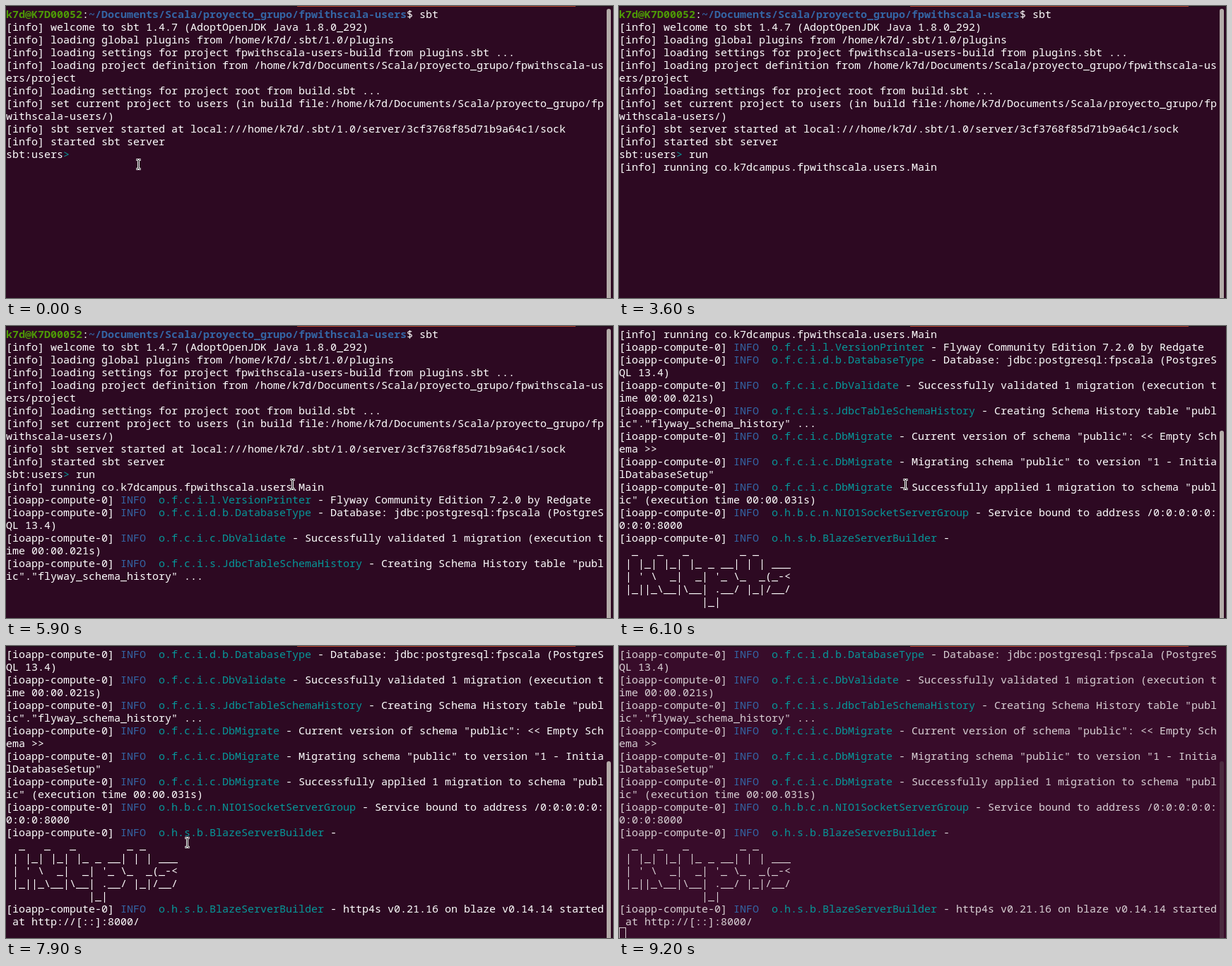
An HTML page that plays this animation: 859x413 px, repeating every 9300 ms.

```html
<!DOCTYPE html>
<html lang="en">
<head>
<meta charset="utf-8">
<title>Terminal</title>
<style>
  html, body { margin: 0; width: 100%; height: 100%; overflow: hidden; }
  body {
    --k: 0%;
    position: relative;
    background: color-mix(in srgb, #2d0922, #380c2a var(--k));
    color: color-mix(in srgb, #fff, #d8d0d4 var(--k));
  }
  pre, div, svg { position: absolute; margin: 0; }
  pre {
    left: 0; top: 2px;
    font: 15px/18px "Noto Sans Mono", "DejaVu Sans Mono", monospace;
    font-variant-ligatures: none;
  }
  .host { color: #4e9a06; font-weight: bold; }
  .path { color: #3465a4; font-weight: bold; }
  .info { color: #3465a4; }
  .name { color: #06989a; }
  #strip { left: 0; top: 0; width: 100%; height: 1px; background: #1f1019; }
  #accent { left: 412px; top: 0; width: 394px; height: 1px; background: #b5482c; }
  #bar {
    left: 850px; width: 6px; height: 420px; border-radius: 3px;
    background: color-mix(in srgb, #b4aca9, #4a2a3f var(--k));
  }
  #caret { width: 9px; height: 18px; background: #fff; }
  #caret.hollow { width: 8px; height: 17px; background: none; border: 1px solid #d8d0d4; }
  #mouse { left: 0; top: 0; }
</style>
</head>
<body>
<pre id="text"></pre>
<div id="caret"></div>
<div id="strip"></div>
<div id="accent"></div>
<div id="bar"></div>
<svg id="mouse" width="9" height="18" fill="none">
  <path id="beam" d="M1.5 2.5H3.5L4.5 3.5L5.5 2.5H7.5M4.5 3V15M1.5 15.5H3.5L4.5 14.5L5.5 15.5H7.5" stroke="#fff" stroke-width="3"/>
  <use href="#beam" style="stroke:#000"/>
  <path d="M1.5 2.5H3.5L4.5 3.5L5.5 2.5H7.5M4.5 3V15M1.5 15.5H3.5L4.5 14.5L5.5 15.5H7.5" stroke="#111"/>
</svg>
<script>
const LOOP = 9300, STEP = 100, ROWS = 23, LINE = 18, CELL = 9;
const $ = id => document.getElementById(id);

const log = String.raw`k7d@K7D00052:~/Documents/Scala/proyecto_grupo/fpwithscala-users$ sbt
[info] welcome to sbt 1.4.7 (AdoptOpenJDK Java 1.8.0_292)
[info] loading global plugins from /home/k7d/.sbt/1.0/plugins
[info] loading settings for project fpwithscala-users-build from plugins.sbt ...
[info] loading project definition from /home/k7d/Documents/Scala/proyecto_grupo/fpwithscala-us
ers/project
[info] loading settings for project root from build.sbt ...
[info] set current project to users (in build file:/home/k7d/Documents/Scala/proyecto_grupo/fp
withscala-users/)
[info] sbt server started at local:///home/k7d/.sbt/1.0/server/3cf3768f85d71b9a64c1/sock
[info] started sbt server
sbt:users> run
[info] running co.k7dcampus.fpwithscala.users.Main
[ioapp-compute-0] INFO  o.f.c.i.l.VersionPrinter - Flyway Community Edition 7.2.0 by Redgate
[ioapp-compute-0] INFO  o.f.c.i.d.b.DatabaseType - Database: jdbc:postgresql:fpscala (PostgreS
QL 13.4)
[ioapp-compute-0] INFO  o.f.c.i.c.DbValidate - Successfully validated 1 migration (execution t
ime 00:00.021s)
[ioapp-compute-0] INFO  o.f.c.i.s.JdbcTableSchemaHistory - Creating Schema History table "publ
ic"."flyway_schema_history" ...
[ioapp-compute-0] INFO  o.f.c.i.c.DbMigrate - Current version of schema "public": << Empty Sch
ema >>
[ioapp-compute-0] INFO  o.f.c.i.c.DbMigrate - Migrating schema "public" to version "1 - Initia
lDatabaseSetup"
[ioapp-compute-0] INFO  o.f.c.i.c.DbMigrate - Successfully applied 1 migration to schema "publ
ic" (execution time 00:00.031s)
[ioapp-compute-0] INFO  o.h.b.c.n.NIO1SocketServerGroup - Service bound to address /0:0:0:0:0:
0:0:0:8000
[ioapp-compute-0] INFO  o.h.s.b.BlazeServerBuilder -
  _   _   _        _ _
 | |_| |_| |_ _ __| | | ___
 | ' \  _|  _| '_ \_  _(_-<
 |_||_\__|\__| .__/ |_|/__/
             |_|
[ioapp-compute-0] INFO  o.h.s.b.BlazeServerBuilder - http4s v0.21.16 on blaze v0.14.14 started
 at http://[::]:8000/`.split("\n");

const PROMPT = 11, PROMPT_LEN = 11;
const keys = [1500, 1700, 2000], enter = 2600;
const output = [[0, 12], [3600, 13], [5800, 16], [5900, 20], [6000, 26], [6100, 34], [6500, 36]];
const blinks = [100, 700, 1100, 3100, 3700, 4300, 4900, 5800, 6500, 6700, 7300, 7900, 8600];
const progress = "  | => root / Compile / selectMainClass 0s";

const passed = (times, t) => times.filter(x => x <= t).length;
const ease = u => u * u * (3 - 2 * u);
const span = (cls, s) => `<span class="${cls}">${s}</span>`;

function paint(line) {
  return line.replace(/</g, "&lt;")
    .replace(/^(k7d@\w+):(.*)\$/, (m, host, path) => span("host", host) + ":" + span("path", path) + "$")
    .replace(/^(sbt:users)>/, (m, s) => s + span("name", ">"))
    .replace(/INFO  (\S+)/, (m, s) => span("info", "INFO") + "  " + span("name", s));
}

// Centre of the pointer, or null while it is hidden
function pointer(t) {
  const move = (x0, y0, x1, y1, u) => {
    const e = ease(Math.min(u, 1));
    return [x0 + (x1 - x0) * e, y0 + (y1 - y0) * e];
  };
  if (t < 1100) return [187, 223];
  if (t < 4100) return null;
  if (t < 7600) return move(187, 223, 405, 223, (t - 4100) / 800);
  if (t < 8100) return move(405, 223, 256, 277, (t - 7500) / 400);
  if (t < 8300) return move(256, 277, 57, 12, (t - 8000) / 200);
  return null;
}

let shown = "";
function draw(now) {
  const t = Math.floor(now % LOOP / STEP) * STEP;
  const count = output.filter(o => o[0] <= t).pop()[1];
  const typed = passed(keys, t);
  const scroll = Math.max(0, count - ROWS + 1);

  const lines = log.slice(0, count);
  lines[PROMPT] = lines[PROMPT].slice(0, PROMPT_LEN + typed);
  if (t >= 2900 && t < 3400) lines.push("", progress);
  const html = lines.slice(scroll).map(paint).join("\n");
  if (html !== shown) $("text").innerHTML = shown = html;

  const typing = t < enter;
  const row = typing ? PROMPT : count - scroll;
  const caret = $("caret");
  caret.style.left = (typing ? PROMPT_LEN + typed : 0) * CELL + "px";
  caret.style.top = 2 + row * LINE + "px";
  caret.style.visibility = passed(blinks, t) % 2 ? "visible" : "hidden";
  caret.className = t >= 9100 ? "hollow" : "";

  $("bar").style.top = 4 + 420 * scroll / (ROWS + scroll) + "px";
  document.body.style.setProperty("--k", t < 9100 ? "0%" : t < 9200 ? "50%" : "100%");

  const p = pointer(t), mouse = $("mouse");
  mouse.style.visibility = p ? "visible" : "hidden";
  if (p) mouse.style.transform = `translate(${Math.round(p[0]) - 4}px, ${Math.round(p[1]) - 8}px)`;
}

let start;
function tick(now) {
  start ??= now;
  draw(now - start);
  requestAnimationFrame(tick);
}
draw(0);
requestAnimationFrame(tick);
</script>
</body>
</html>
```
